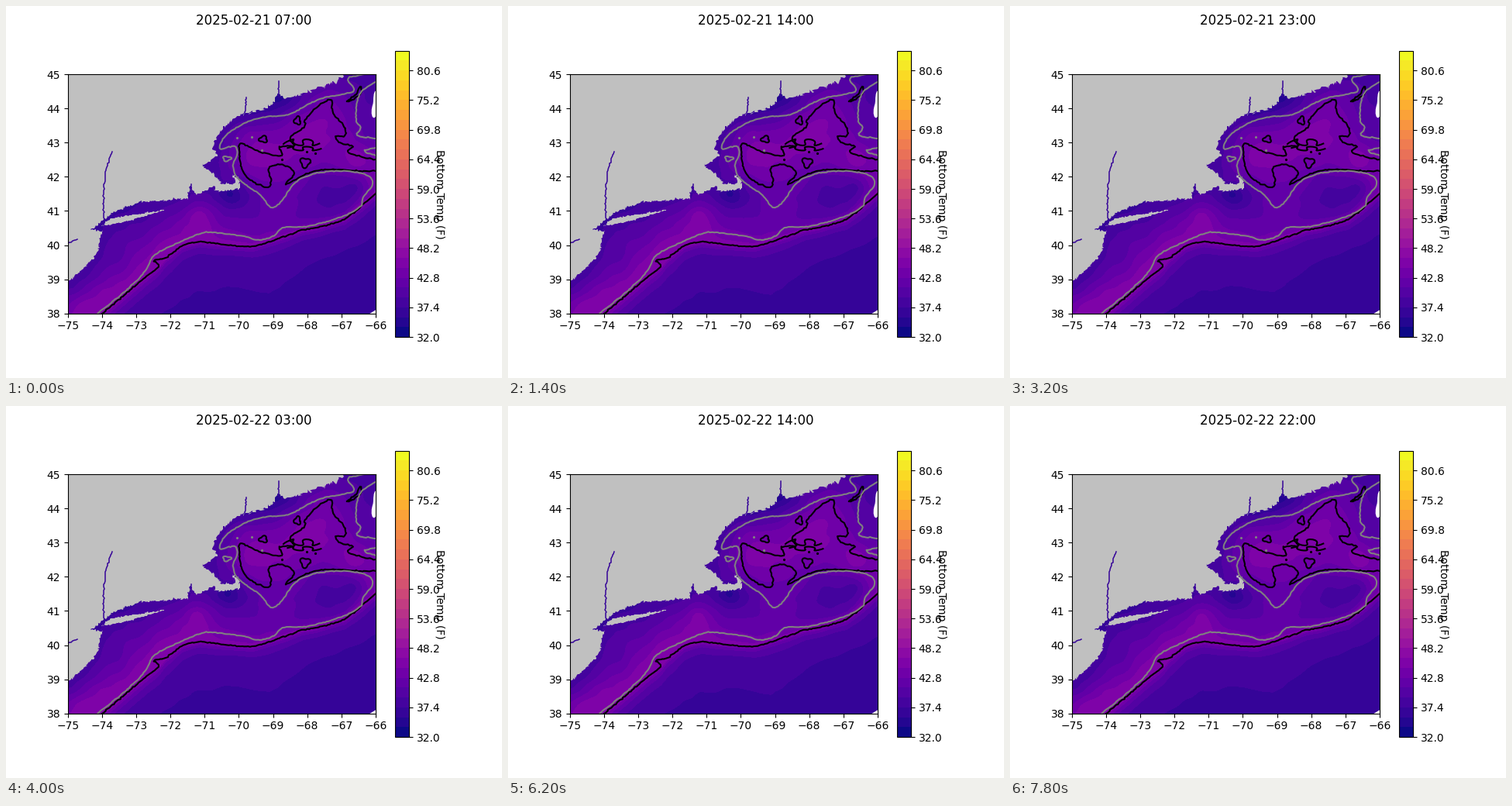
These frames come from a looping animation (640x480 px, 8000 ms). A matplotlib script:

```python
import numpy as np
import matplotlib.pyplot as plt
from matplotlib.animation import FuncAnimation
from matplotlib.cm import ScalarMappable
from matplotlib.colors import BoundaryNorm, ListedColormap

FRAMES, STEP_MS = 40, 200
SCALE = 396.8 / 9          # pixels per degree
LEVELS = 32 + 1.8 * np.arange(30)
BANDS = plt.get_cmap("plasma")(np.linspace(0, 1, 29))

# Bottom temperature samples: x, y (pixels), degrees C
SAMPLES = [
    100, 348, 3.6, 122, 305, 3.3, 86, 365, 4.2, 95, 388, 7.3, 125, 370, 7.3,
    148, 354, 6.8, 150, 331, 5.2, 135, 305, 4.3, 170, 336, 7.0, 200, 310, 7.4,
    184, 301, 5.6, 205, 283, 5.4, 248, 269, 7.5, 275, 282, 5.9, 230, 256, 4.4,
    170, 262, 3.1, 290, 266, 4.4, 340, 272, 5.4, 288, 243, 1.6, 360, 250, 5.3,
    410, 241, 3.7, 450, 232, 3.8, 396, 222, 4.8, 474, 227, 6.7, 282, 222, 4.2,
    262, 212, 3.2, 315, 200, 7.4, 380, 182, 7.4, 450, 200, 7.5, 281, 175, 4.0,
    315, 165, 6.4, 320, 142, 3.1, 350, 120, 1.5, 375, 150, 6.6, 411, 130, 6.8,
    380, 129, 4.6, 445, 130, 4.9, 466, 105, 3.7, 470, 165, 4.4,
]
EDGE = [
    124, 397, 150, 375, 180, 350, 197, 336, 191, 328, 206, 325, 228, 309,
    250, 304, 275, 307, 318, 310, 360, 297, 382, 289, 400, 286, 437, 275,
    465, 252, 477, 242,
]
DEEP = [80, 450, 200, 397, 248, 368, 300, 362, 340, 372, 388, 334, 477, 297]
COAST = [
    80, 356, 103, 337, 119, 316, 124, 291, 109, 288, 124, 278, 140, 265,
    172, 253, 235, 248, 238, 232, 246, 244, 269, 232, 269, 239, 301, 236,
    299, 221, 292, 217, 297, 229, 278, 230, 268, 217, 253, 206, 264, 200,
    274, 192, 266, 185, 269, 173, 280, 157, 297, 143, 330, 133, 345, 125,
    350, 113, 360, 119, 397, 108, 428, 97, 438, 88,
]
ISLAND = [122, 284, 135, 274, 206, 263, 160, 277, 122, 284]
RIVERS = [
    [126, 283, 126, 240, 129, 210, 137, 188],
    [80, 306, 92, 301],
    [308, 141, 310, 118],
    [352, 118, 352, 97],
    [236, 247, 239, 230],
]
SHALLOW = [
    118, 397, 150, 371, 178, 344, 191, 322, 215, 309, 237, 299, 260, 292,
    305, 297, 325, 302, 345, 297, 358, 286, 390, 284, 433, 272, 457, 259,
    461, 247, 473, 230, 466, 218, 435, 213, 400, 216, 373, 228, 356, 251,
    342, 260, 328, 244, 299, 222, 293, 205, 298, 192, 295, 181, 276, 184,
    284, 167, 310, 150, 335, 143, 364, 140, 405, 120, 448, 110, 441, 94,
    463, 88,
]
EAST = [477, 98, 460, 109, 453, 123, 452, 148, 458, 157, 453, 167, 477, 171]
INLET = [477, 183, 462, 187, 477, 193]
BASIN = [
    477, 213, 455, 213, 425, 211, 395, 214, 361, 230, 372, 216, 358, 205,
    339, 209, 342, 226, 336, 234, 312, 222, 303, 205, 301, 178, 312, 181,
    330, 189, 356, 193, 353, 182, 372, 180, 366, 170, 385, 156, 386, 147,
    404, 128, 420, 121, 422, 138, 437, 156, 437, 168, 425, 168, 431, 177,
    448, 181, 440, 188, 460, 195, 477, 198,
]
HOOK = [440, 123, 453, 112, 457, 103, 459, 112, 448, 121, 440, 123]

rng = np.random.default_rng(5)


def pairs(flat):
    return np.reshape(np.array(flat, float), (-1, 2))


def geo(x, y):
    return -75 + (x - 80) / SCALE, 45 - (y - 88.1) / SCALE


def spline(flat):
    """Catmull-Rom curve through the points."""
    p = pairs(flat)
    p = np.vstack([p[:1], p, p[-1:]])
    t = np.linspace(0, 1, 8, endpoint=False)[:, None]
    parts = [b + t / 2 * (c - a + t * (2 * a - 5 * b + 4 * c - d
                                       + t * (3 * (b - c) + d - a)))
             for a, b, c, d in zip(p, p[1:], p[2:], p[3:])]
    return np.vstack(parts + [p[-1:]])


def rough(path, step, amp):
    """Resample a path evenly and shake its inner points."""
    p = pairs(path)
    dist = np.r_[0, np.cumsum(np.hypot(*np.diff(p, axis=0).T))]
    t = np.linspace(0, dist[-1], int(dist[-1] / step) + 2)
    q = np.column_stack([np.interp(t, dist, p[:, k]) for k in (0, 1)])
    q[1:-1] += rng.normal(0, amp, q[1:-1].shape)
    return q


def blob(x, y, rx, ry):
    a = np.linspace(0, 2 * np.pi, 25)
    r = 1 + 0.25 * np.sin(3 * a + x)
    return np.column_stack([x + rx * r * np.cos(a), y + ry * r * np.sin(a)])


def squiggle(x0, x1, y, amp):
    x = np.linspace(x0, x1, 30)
    return np.column_stack([x + 3 * np.sin(x / 2), y + amp * np.sin(x / 3.3)])


# Multiquadric interpolation of the temperature samples
sx, sy, st = np.reshape(np.array(SAMPLES), (-1, 3)).T


def kernel(x, y):
    return np.sqrt((x[..., None] - sx) ** 2 + (y[..., None] - sy) ** 2 + 16)


weights = np.linalg.solve(kernel(sx, sy), st - 5)

gx, gy = np.meshgrid(np.linspace(79, 479, 201), np.linspace(86, 398, 157))
lon, lat = geo(gx, gy)
ridge = np.vstack([(80, 435), np.delete(pairs(EDGE), 4, 0)]).T
run = np.interp(gx + 15, *ridge) - np.interp(gx - 15, *ridge)
off = (gy - np.interp(gx, *ridge)) / np.hypot(1, run / 30)
deep_y = np.interp(gx, *pairs(DEEP).T)
ripple = np.sin(gx / 8 + 2 * np.sin(gy / 13)) * np.sin(gy / 7 + np.sin(gx / 15))
slope_w = 6 + 4 * np.clip((240 - gx) / 100, 0, 1)


def temperature(hour):
    tide = 2 * np.pi * hour / 12.42
    age = hour / 39
    x = gx - 1.2 * np.cos(tide) + age
    y = gy - 0.9 * np.sin(tide)
    shelf = 5 + kernel(x, y) @ weights + 0.13 * ripple
    shelf -= 0.35 * age * np.exp(-((gx - 250) ** 2 + (gy - 268) ** 2) / 500)
    shelf += (7.7 - shelf) * np.exp(np.minimum(off, 0) / 6)
    line = deep_y + 1.5 * np.sin(tide / 2) + 2 * ripple
    deep = np.clip(3 - (gy - line) / 70, 2.3, 3.7)
    deep += (7.7 - deep) * np.exp(-np.maximum(off, 0) / slope_w)
    return 32 + 1.8 * np.clip(np.where(off > 0, deep, shelf), 0.2, 28)


fig, ax = plt.subplots(figsize=(6.4, 4.8), dpi=100)
ax.set_aspect("equal")
ax.set(xlim=(-75, -66), ylim=(38, 45))
ax.autoscale(False)
bar = fig.colorbar(ScalarMappable(BoundaryNorm(LEVELS, 29), ListedColormap(BANDS)),
                   ax=ax, ticks=LEVELS[::3], format="%.1f")
bar.minorticks_off()
bar.set_label("Bottom Temp (F)", rotation=270)
title = fig.suptitle("")


def fill(points, color):
    ax.fill(*geo(*points.T), color=color, lw=0, zorder=2)


def stroke(points, color, width=1.5, z=2.5):
    ax.plot(*geo(*points.T), color=color, lw=width, zorder=z)


coast = rough(COAST, 1.5, 0.9)
north = coast[:, 0] > 300
coast[north] += rng.normal(0, 1.3, (north.sum(), 2))
fill(np.vstack([[(78, 86), (78, 356)], np.round(coast), [(438, 86)]]), "silver")
fill(np.round(rough(ISLAND, 1.5, 0.5)), "silver")
for river in RIVERS:
    stroke(np.round(rough(river, 2, 0.4)), BANDS[2], 1.1, 2.2)
fill(blob(478, 129, 6, 16), "white")
fill(pairs([466, 399, 479, 391, 479, 399]), "white")

for path in (EDGE, BASIN, HOOK):
    stroke(rough(spline(path), 2.5, 0.4), "black")
for shape in (blob(332, 172, 5, 4), blob(376, 148, 4, 5), blob(386, 202, 6, 6),
              squiggle(361, 403, 176, 4), squiggle(364, 404, 184, 2.5)):
    stroke(shape, "black")
for path in (SHALLOW, EAST, INLET):
    stroke(rough(spline(path), 2.5, 0.3), "grey")
stroke(blob(285, 197, 5, 3), "grey")
for dots, color in (([298, 170, 317, 169, 330, 186], "grey"),
                    ([356, 198, 399, 190, 388, 188], "black")):
    ax.plot(*geo(*pairs(dots).T), ".", color=color, ms=2.5, zorder=2.5)

layers = []


def draw(i):
    while layers:
        layers.pop().remove()
    layers.append(ax.contourf(lon, lat, temperature(i), LEVELS,
                              colors=list(BANDS), zorder=1))
    hour = 7 + i
    title.set_text(f"2025-02-{21 + hour // 24} {hour % 24:02d}:00")
    return layers + [title]


anim = FuncAnimation(fig, draw, frames=FRAMES, interval=STEP_MS,
                     init_func=lambda: [], repeat=True, repeat_delay=0)
plt.show()
```
